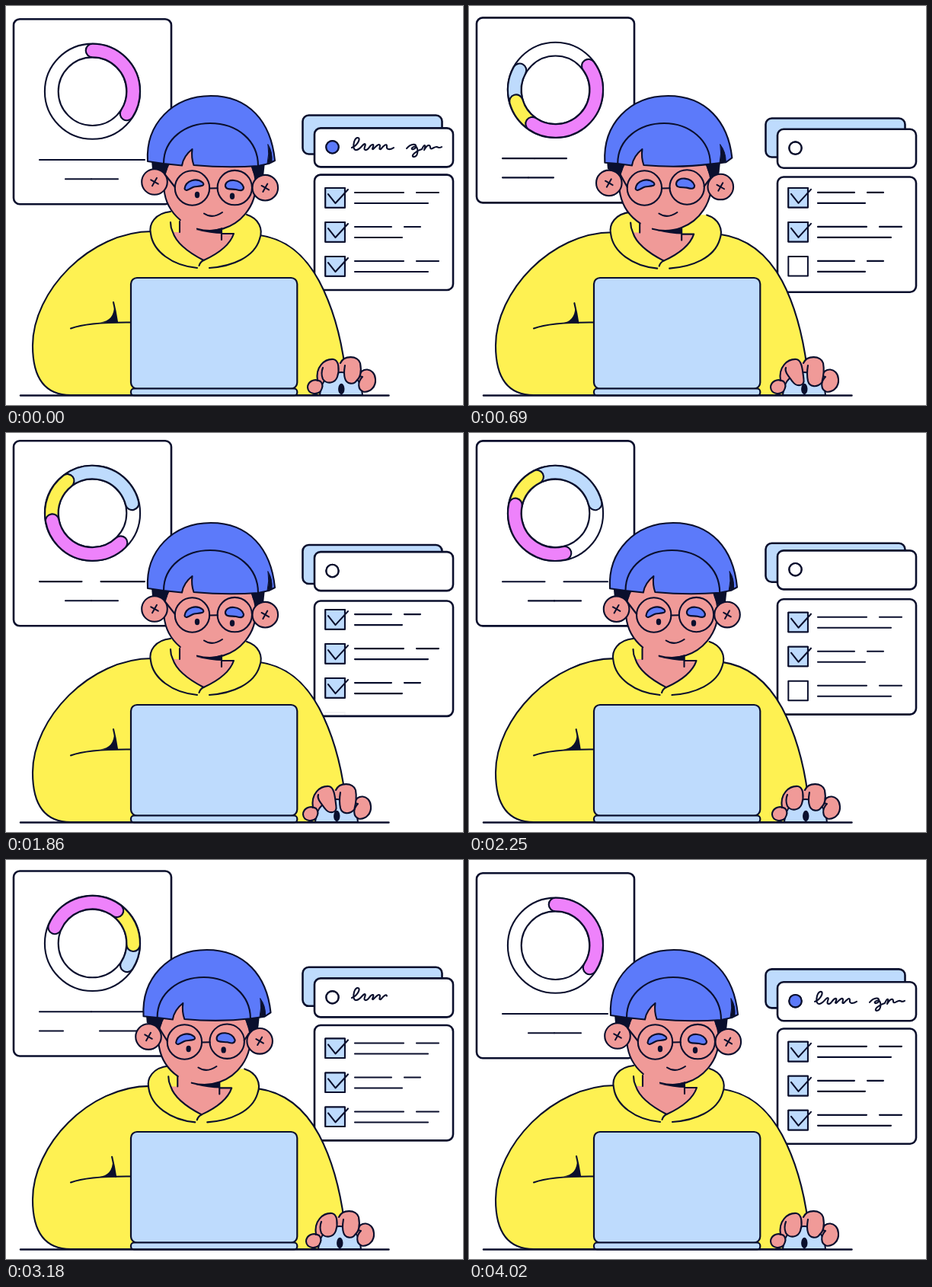
These frames come from a looping animation (600x524 px, 4.05 s). An HTML page with a canvas:

```html
<!DOCTYPE html>
<html lang="en">
<head>
<meta charset="utf-8">
<title>Desk work</title>
<style>
html, body { margin: 0; width: 100%; height: 100%; overflow: hidden; background: #fff; }
canvas { display: block; width: 600px; height: 524px; }
</style>
</head>
<body>
<canvas id="stage" width="600" height="524"></canvas>
<script>
const ctx = document.getElementById('stage').getContext('2d');
const LOOP = 4050;
const INK = '#0a0f2d', BLUE = '#5c7afa', SKY = '#bedbfd', YELLOW = '#fef152',
      SKIN = '#f09a98', PINK = '#ee82fb', WHITE = '#fff';

// ---- timing ----
const clamp = v => Math.max(0, Math.min(1, v));
const ramp = (t, a, b) => { const x = clamp((t - a) / (b - a)); return x * x * (3 - 2 * x); };
// Eases up from a, stays, eases down from b.
const hold = (t, a, b, ease) => ramp(t, a, a + ease) - ramp(t, b, b + ease);
const rad = deg => deg * Math.PI / 180;
const wave = (t, mid, size, deg) => mid + size * Math.cos(2 * Math.PI * t / LOOP - rad(deg));

// ---- drawing helpers ----
function paint(path, fill, stroke = INK, width = 2.1) {
  if (fill) { ctx.fillStyle = fill; ctx.fill(path); }
  if (stroke) { ctx.strokeStyle = stroke; ctx.lineWidth = width; ctx.stroke(path); }
}
const shape = (d, fill, stroke, width) => paint(new Path2D(d), fill, stroke, width);
const line = (x1, y1, x2, y2, width) => shape(`M${x1},${y1}L${x2},${y2}`, null, INK, width);

function box(x, y, w, h, r, fill, width = 2.6) {
  const p = new Path2D();
  p.roundRect(x, y, w, h, r);
  paint(p, fill, INK, width);
}
function oval(x, y, rx, ry, fill, stroke) {
  const p = new Path2D();
  p.ellipse(x, y, rx, ry, 0, 0, 7);
  paint(p, fill, stroke);
}
function shifted(dx, dy, draw) {
  ctx.save();
  ctx.translate(dx, dy);
  draw();
  ctx.restore();
}

// ---- chart card ----
// Every edge of the ring makes one full turn in three spins, each at its own pace.
function edge(t, from, first, second, pace) {
  return from + first * ramp(t, 0, pace * .75)
    + second * ramp(t, 1230, 1230 + pace)
    + (360 - first - second) * ramp(t, 2700, 2700 + pace * .83);
}

function band(y, from, to, color) {
  if (to < from + .5) return;
  const p = new Path2D();
  p.arc(113.5, y, 53.7, rad(from - 90), rad(to - 90));
  paint(p, null, INK, 19.7);
  paint(p, null, color, 15.4);
}

function note(y, from, to, mid, gap) {
  line(from, y, mid - gap / 2, y);
  line(mid + gap / 2, y, to, y);
}

function chart(t) {
  const top = wave(t, 13.7, 3.5, 0), cy = top + 95;
  box(10, top, 207, 243, 8, WHITE);
  oval(113.5, cy, 62.6, 62.6, WHITE);
  oval(113.5, cy, 44.8, 44.8, WHITE);

  const start = edge(t, 0, 54, 113, 960), pink = edge(t, 123, 96, 63, 1060),
        yellow = edge(t, 123, 131, 79, 820), sky = edge(t, 123, 176, 137, 620);
  band(cy, yellow, sky, SKY);
  band(cy, pink, yellow, YELLOW);
  band(cy, start, pink, PINK);

  const brief = hold(t, 250, 1370, 350), split = hold(t, 1370, 2720, 350), wide = hold(t, 2720, 3400, 350);
  note(top + 184.8, 44, 182 - 54 * brief, 112 - 26 * brief, 25 * split);
  note(top + 210, 78 - 34 * (brief + wide), 147 - 36 * brief + 35 * wide, 112 - 34 * brief - 13 * wide, 48 * wide);
}

// ---- signature cards ----
const pen = [
  'M454,186C462,183 467,172 461,173C456,175 454,190 460,189C466,188 468,181 471,181C474,182 467,189 473,189C477,188 478,181 482,182C484,184 479,188 482,188C486,184 490,180 491,183C491,187 489,188 492,188C496,183 500,180 500,184C499,189 504,189 509,186',
  'M526,187C532,180 540,180 538,186C533,191 529,186 538,184C542,188 541,198 535,198C531,197 538,190 546,188C549,181 552,181 549,189C553,182 557,181 557,186C558,190 562,184 566,185C569,187 570,186 572,185',
  'M572,185C580,181 586,188 595,184'
].map(d => {
  const el = document.createElementNS('http://www.w3.org/2000/svg', 'path');
  el.setAttribute('d', d);
  return { path: new Path2D(d), len: el.getTotalLength() };
});

function trimmed(p, from, to) {
  if (to - from < .01) return;
  ctx.setLineDash([(to - from) * p.len, p.len * 2]);
  ctx.lineDashOffset = -from * p.len;
  paint(p.path, null);
  ctx.setLineDash([]);
}

function signature(t) {
  const back = wave(t, 144.8, 4, 109), front = wave(t, 157.8, 4, 50);
  box(389.5, back, 183, 51, 8, SKY);
  box(405, front, 182, 51, 8, WHITE);
  shifted(0, front - 160.3, () => {
    const dot = 1 - hold(t, 250, 3450, 220);
    oval(428.5, 185.2, 8.2, 8.2, WHITE);
    if (dot > .02) oval(428.5, 185.2, 7.6 * dot, 7.6 * dot, BLUE, null);
    oval(428.5, 185.2, 8.2, 8.2, null);
    if (t < 1000) {
      trimmed(pen[0], ramp(t, 60, 300), 1);
      trimmed(pen[1], ramp(t, 180, 420), 1);
      trimmed(pen[2], ramp(t, 360, 510), ramp(t, 30, 180));
    } else {
      trimmed(pen[0], 0, clamp((t - 2880) / 340));
      trimmed(pen[1], 0, ramp(t, 3300, 3800));
    }
  });
}

// ---- checklist ----
// One row up, with a small overshoot.
const roll = (t, s) => ramp(t, s, s + 270) + .07 * Math.sin(Math.PI * clamp((t - s - 150) / 300));

function row(y, long, done) {
  box(419.3, y, 25.6, 25.6, 0, WHITE, 2);
  if (done > 0) {
    const alpha = ctx.globalAlpha;
    ctx.globalAlpha = alpha * done;
    box(419.3, y, 25.6, 25.6, 0, SKY, 2);
    ctx.globalAlpha = alpha;
    const down = clamp(done / .45), up = clamp((done - .45) / .55);
    shape(`M423,${y + 8}l${9.5 * down},${12 * down}l${16.5 * up},${-18 * up}`, null);
  }
  const end = long ? 522 : 506;
  line(458, y + 6, end, y + 6);
  line(end + 17, y + 6, long ? 568 : 544, y + 6);
  line(458, y + 20, long ? 554 : 520, y + 20);
}

function checklist(t) {
  const top = wave(t, 220.6, 4, 75);
  box(405, top, 182, 151.3, 8, WHITE);
  const scroll = roll(t, 420) + roll(t, 1800);
  ctx.save();
  ctx.beginPath();
  ctx.rect(406, top + 1.5, 180, 148.5);
  ctx.clip();
  for (let i = 0; i < 5; i++) {
    const r = i - scroll;
    const done = i < 3 ? 1 : clamp((t - 1020 - 1400 * (i - 3)) / 300);
    ctx.globalAlpha = clamp(Math.min(1.35 + 2 * r, 3.2 - 1.1 * r));
    row(top + 17.4 + 45 * r, i % 2 === 0, done);
  }
  ctx.restore();
}

// ---- person: p runs from 0 (facing right) to 1 (facing left) ----
function body(p) {
  const x = -6.5 * p, y = 2 * p;
  shape(`M${192 + x},${296 + y}C${110 + x / 2},${296 + y} 35,375 35,446C35,485 48,511 85,511
    L446,511L${445 - 2 * p},475C${440 - 2 * p},437 429,395 411,361
    C399,339 ${377 + x / 2},${307 - y} ${333 + x},${301 - y}Z`, YELLOW);
  shape('M85,423.5Q108,415 164,415.5', null);
  shifted(-4.5 * p, y, () => {
    shape('M141,389Q144,401 146,415', null);
    shape('M142,394L146.5,415.5L124,415.5Q142,413 142,394Z', INK, null);
  });
  shifted(x, p, () => {
    const left = 'M216,270C196,272 187,286 190,299C193,322 218,341 251,344';
    const right = 'C297,342 326,330 333,306C338,293 332,279 316,274';
    shape(left + 'L267,344' + right + 'Z', YELLOW, null);
    shape(left + 'M267,344' + right, null);
    const collar = 'C224,313 244,326 259.5,334C277,326 294,314 299,299H283';
    shape('M228,270V297H219' + collar + 'V270Z', SKIN, null);
    shape('M216,284Q216,291 219,297' + collar + 'M228,283V297M283,292V307', null);
    shape('M259.5,334Q255,336 253.5,341', null);
  });
}

function ear(x, y) {
  oval(x, y, 16.8, 16.8, SKIN);
  ctx.save();
  ctx.translate(x, y);
  ctx.rotate(.52);
  line(-5.5, 0, 5.5, 0, 2);
  line(0, -6, 0, 6, 2);
  ctx.restore();
}

function face(p) {
  shifted(-17 * p, 0, () => {
    oval(267.5, 235, 60.3, 60, SKIN, null);
    const jaw = new Path2D();
    jaw.ellipse(267.5, 235, 60.3, 60, 0, rad(130 - 12 * p), rad(466));
    paint(jaw, null);
    shape('M191,203L213,204Q213,216 208,222L192,214Z', INK, null);
    shape('M321,204L340,205L338,224L328,226Q322,216 321,204Z', INK, null);
  });
  shifted(-7 * p, p, () => shape('M249,294Q270,296 284,291V299Q270,299 249,294Z', INK, null));
}

function hair(p) {
  const cap = x => x - 13 * p, left = x => x - 20 * p, right = x => x - 24 * p, part = x => x - 29 * p;
  shape(`M${cap(186)},${204 + 3 * p}C${cap(183)},155 ${cap(219)},118 ${cap(269)},118
    C${cap(319)},118 ${cap(348)},152 ${cap(353)},${203 - 6 * p}L${cap(345)},${207 - 3 * p}
    L${right(331)},${210 - 4 * p}Q${right(290)},213 ${part(246.5)},209Q${part(243)},199 ${part(244.5)},188
    Q${part(233)},197 ${part(231)},209.5L${left(207)},207Z`, BLUE);
  shape(`M${left(207)},207C${left(207)},174 ${left(236)},154 ${left(268)},154
    C${right(304)},154 ${right(331)},177 ${right(331)},${210 - 4 * p}`, null);
  shifted(-24 * p, 0, () =>
    shape(`M344,182Q${350 + 2 * p},191 ${349 + 4 * p},204L343,207Q346,194 344,182Z`, INK, INK, 1));
}

function features(p, blink) {
  const lx = 244.5 - 24 * p, rx = 300.3 - 24 * p;
  oval(lx, 239, 22.7, 22.7, null);
  oval(rx, 238.6 - p, 22.7, 22.7, null);
  line(lx + 22.5, 239.5, rx - 22.5, 239.2);
  shifted(-27 * p, 0, () => {
    shape('M234.5,240C236,229 250,225 258.5,232C262,237 254,236.5 247,237.5C242,239 236,245 234.5,240Z', BLUE);
    shifted(0, -4 * p, () =>
      shape('M288,235C290,226 308,227 312,238C312,244 306,242 302,241C296,240 287,242 288,235Z', BLUE));
    const open = 1 - blink;
    if (open > .05) {
      oval(251, 248, 3.2, 4.2 * open, INK, null);
      oval(297, 249.7 - .7 * p, 3.2, 4.2 * open, INK, null);
    }
  });
  shifted(-18 * p, 0, () => shape('M260,272.5Q271,280 284,271', null));
}

function head(p, blink) {
  face(p);
  ear(195 - 19 * p, 231 + 2.5 * p);
  ear(340.3 - 17 * p, 238.7 - 2 * p);
  line(222 - 24 * p, 238, 208.5 - 17 * p, 221);
  if (p > .1) line(322.8 - 24 * p, 237, 326 - 17 * p, 229 - 3 * p);
  hair(p);
  features(p, blink);
}

function laptop() {
  box(164, 357, 218.3, 145.5, 8, SKY, 2.2);
  box(164, 502.5, 218.3, 9, 4, SKY, 2.2);
}

function hand(dx, press) {
  const k = 9 * press, d = 3.5 * press;
  shifted(dx, 0, () => {
    shape('M409,494C404,474 420,463 431,464L440,470C446,459 462,460 465,470L468,490L414,500Z', SKIN, null);
    shape('M412,511C413,491 426,481 440,481C456,481 467,491 468,511Z', SKY);
    oval(440.3, 503, 4.2, 7.2, INK, null);
    shape('M413,493C404,488 396,494 396,501C397,510 408,511 413,506C416,501 416,496 413,493Z', SKIN);
    shape('M464,486C465,474 484,474 485,490C486,500 478,508 469,506.5C462,504 461,494 468,487Z', SKIN);
    shape(`M409,492C406,474 418,463 430,464C437,465 438,478 ${435 + k / 2},${487 + d}
      C${432 + k},${496 + d} ${421 + k},${497 + d} ${416 + k},${490 + d}C${414 + k / 2},485 414,480 416,475`, SKIN);
    shape(`M439,469C444,458 462,459 465,469C467,480 465,488 ${461 + k / 4},${491 + d}
      C457,${498 + d} 447,${497 + d} 445,${489 + d}C443,483 444,478 445,472`, SKIN);
  });
}

function draw(t) {
  ctx.fillStyle = WHITE;
  ctx.fillRect(0, 0, 600, 524);
  ctx.lineCap = 'round';
  ctx.lineJoin = 'round';
  const turn = hold(t, 400, 1320, 520) + .42 * hold(t, 2130, 3230, 450);
  const blink = hold(t, 570, 720, 90);
  const slide = -6 * hold(t, 700, 1900, 500) + 7 * hold(t, 2000, 2640, 530) - 2 * hold(t, 2640, 3300, 530);
  const click = at => hold(t, at - 150, at + 60, 120);

  chart(t);
  signature(t);
  checklist(t);
  body(turn);
  head(turn, blink);
  laptop();
  hand(slide, click(690) + click(1860) + .45 * click(2610));
  line(19, 511.5, 502.5, 511.5, 2.4);
}

function frame() {
  draw(performance.now() % LOOP);
  requestAnimationFrame(frame);
}
frame();
</script>
</body>
</html>
```
